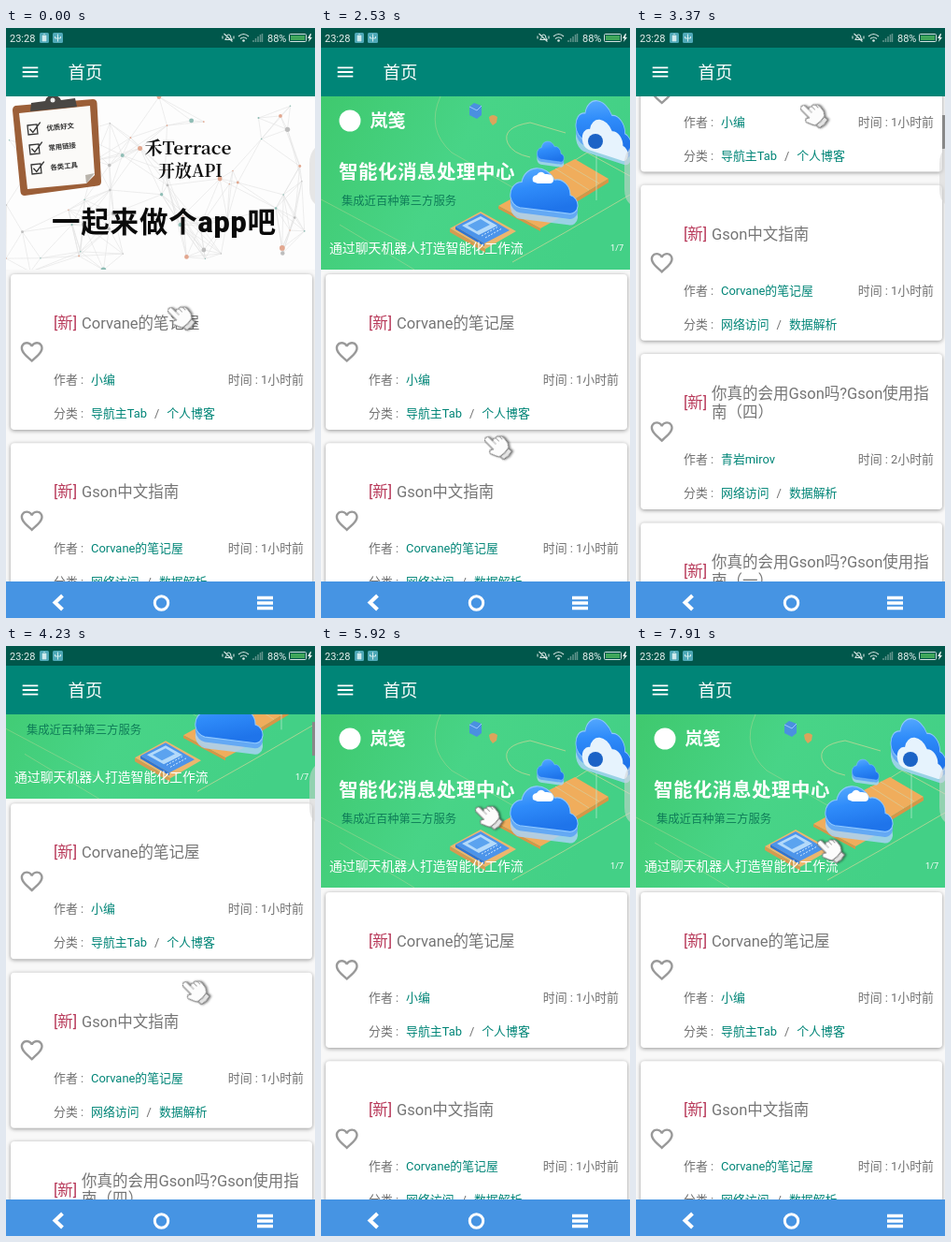
Recreate the animation shown at these times as an HTML page. Size 331 px wide and 630 px high, loop 8 s.

```html
<!DOCTYPE html>
<html lang="zh-CN">
<head>
<meta charset="utf-8">
<title>首页</title>
<style>
html, body { margin: 0; width: 100%; height: 100%; overflow: hidden; background: #f8f8f8; }
svg { display: block; width: 331px; height: 630px; }
text { font-family: Roboto, "Noto Sans CJK SC", "Noto Sans CJK", sans-serif; white-space: pre; }
.serif { font-family: "Noto Serif CJK SC", "Noto Serif", serif; font-weight: 700; }
.card rect { fill: #fff; filter: drop-shadow(0 1.5px 2px rgba(0,0,0,.4)); }
.name { font-size: 16.5px; fill: #757575; }
.new { font-size: 16.5px; fill: #b83a5a; }
.meta { font-size: 12.9px; fill: #707070; }
.tag { fill: #008577; }

#hand, #list, #first, #second, #bar, #pull, #disc, #turn, #arc {
  animation: 8s linear infinite;
}
#hand { animation-name: hand; }
#list { animation-name: list; }
#first { animation-name: first; }
#second { animation-name: second; }
#bar { animation-name: bar; }
#pull { animation-name: pull; }
#disc { animation-name: disc; }
#turn { animation-name: turn; animation-duration: calc(8s / 6); }
#arc { animation-name: arc; animation-duration: calc(8s / 6); animation-delay: -390ms; animation-timing-function: ease-in-out; }

@keyframes hand {
  0%, 2.75% { transform: translate(187px, 308px); }
  5%, 7.5% { transform: translate(187px, 162px); }
  17.375%, 29.125% { transform: translate(190px, 385px); }
  31.625%, 34.5% { transform: translate(189px, 446px); }
  42.125%, 44.75% { transform: translate(190px, 92px); }
  55.6%, 59.4% { transform: translate(207px, 460px); animation-timing-function: ease-out; }
  66.875%, 74% { transform: translate(179px, 181px); animation-timing-function: linear; }
  83.1%, 97.375% { transform: translate(185px, 418px); }
  98.875%, 100% { transform: translate(208px, 217px); }
}
@keyframes list {
  0%, 35.25% { transform: translateY(0); }
  42.125% { transform: translateY(-275px); }
  43.875%, 45.5% { transform: translateY(-345px); }
  54.5% { transform: translateY(-40px); }
  57.125% { transform: translateY(-7.3px); }
  58%, 100% { transform: translateY(0); }
}
@keyframes first { 0%, 18.74% { visibility: visible; } 18.75%, 100% { visibility: hidden; } }
@keyframes second { 0%, 18.74% { visibility: hidden; } 18.75%, 100% { visibility: visible; } }
@keyframes bar {
  0%, 35.24% { opacity: 0; transform: translateY(0); }
  35.25% { opacity: 1; transform: translateY(0); }
  42.125% { opacity: 1; transform: translateY(20px); }
  43.875%, 45.5% { opacity: 1; transform: translateY(25px); }
  56% { opacity: 1; transform: translateY(1px); }
  60%, 100% { opacity: 0; transform: translateY(0); }
}
@keyframes pull {
  0%, 9% { transform: translate(166px, 50px); }
  13% { transform: translate(166px, 112px); }
  17.5% { transform: translate(166px, 152px); animation-timing-function: ease-out; }
  20%, 27.5% { transform: translate(166px, 114px); }
  27.6%, 75.2% { transform: translate(166px, 50px); }
  79% { transform: translate(166px, 112px); }
  83.4% { transform: translate(166px, 156px); animation-timing-function: ease-out; }
  86%, 93.8% { transform: translate(166px, 114px); }
  93.9%, 100% { transform: translate(166px, 50px); }
}
@keyframes disc {
  0%, 25.6% { transform: scale(1); }
  27.5%, 74% { transform: scale(0); }
  74.1%, 92% { transform: scale(1); }
  93.8%, 99.9% { transform: scale(0); }
}
@keyframes turn { from { transform: rotate(-125deg); } to { transform: rotate(235deg); } }
@keyframes arc {
  0% { stroke-dasharray: 4 100; transform: rotate(0deg); }
  50% { stroke-dasharray: 75 100; transform: rotate(0deg); }
  100% { stroke-dasharray: 4 100; transform: rotate(360deg); }
}
</style>
</head>
<body>
<svg viewBox="0 0 331 630">
  <defs>
    <linearGradient id="green" x2="1" y2=".3">
      <stop stop-color="#3fc96e"/><stop offset=".5" stop-color="#48d487"/><stop offset="1" stop-color="#43d086"/>
    </linearGradient>
    <linearGradient id="sky" x2=".5" y2="1">
      <stop stop-color="#62b2ff"/><stop offset=".5" stop-color="#2f8cfa"/><stop offset="1" stop-color="#1f74ea"/>
    </linearGradient>
    <clipPath id="page"><rect y="73" width="331" height="518"/></clipPath>
    <clipPath id="slot"><rect y="73" width="331" height="185"/></clipPath>
    <path id="puff" d="M-34 8a14 14 0 0 1 12-16a19 19 0 0 1 35-6a13 13 0 0 1 17 13a9 9 0 0 1-2 18H-24a11 11 0 0 1-10-9z"/>
    <g id="cloud">
      <use href="#puff" y="11" fill="#a9d3f6" opacity=".85"/>
      <use href="#puff" y="5" fill="#64a9f4"/>
      <use href="#puff" fill="url(#sky)" stroke="#8fc8ff"/>
    </g>
    <path id="heart" fill="#999" d="M16.5 3c-1.74 0-3.41.81-4.5 2.09C10.910 3.810 9.240 3 7.500 3 4.420 3 2 5.420 2 8.500c0 3.780 3.400 6.860 8.550 11.540L12 21.350l1.450-1.320C18.600 15.360 22 12.280 22 8.500 22 5.420 19.580 3 16.500 3zm-4.400 15.550l-.1.1-.1-.1C7.140 14.240 4 11.390 4 8.500 4 6.500 5.500 5 7.500 5c1.540 0 3.040.99 3.570 2.360h1.870C13.460 5.990 14.960 5 16.500 5c2 0 3.500 1.500 3.500 3.500 0 2.890-3.140 5.740-7.900 10.050z"/>
  </defs>

  <rect width="331" height="630" fill="#f8f8f8"/>

  <g clip-path="url(#page)">
    <g id="list">
      <g clip-path="url(#slot)">
        <g id="first">
          <rect y="73" width="331" height="185" fill="#fdfdfd"/>
          <g id="net"></g>
          <path d="M10 83L93 76Q97 76 97.500 80L102 164Q102 168 98 168.500L20 179Q16 179 15.500 175L7 88Q7 84 10 83z" fill="#9c5f38"/>
          <path d="M14 91L90 83L95 157L86 166L23 172z" fill="#fbfaf8"/>
          <path d="M95 155L85 157L86 166z" fill="#b9b4ac"/>
          <path d="M26 89l1-9 15-2q1-6 8-6t9 5l15-2 2 9z" fill="#4a4744"/>
          <circle cx="50" cy="77" r="2.500" fill="#eee"/>
          <g id="ticks"></g>
          <text class="serif" x="195" y="135" font-size="19" text-anchor="middle" fill="#111">禾Terrace</text>
          <text class="serif" x="197.500" y="158.500" font-size="18" text-anchor="middle" fill="#111">开放API</text>
          <text x="49" y="218" font-size="30.500" letter-spacing=".8" font-weight="900" fill="#0a0a0a">一起来做个app吧</text>
        </g>
        <g id="second">
          <rect y="73" width="331" height="185" fill="url(#green)"/>
          <g fill="none" stroke="#d9d79a" stroke-width=".9">
            <path d="M128 73Q112 108 140 133L240 190M0 183L100 236M20 210L100 258" opacity=".4"/>
            <path d="M262 112L224 101Q193 106 200 123Q205 134 224 138M331 178L262 218L205 250M258 150L285 133L331 158" opacity=".75"/>
          </g>
          <path d="M190 190L223 172L268 196L235 214z" fill="#f0ad5c"/>
          <path d="M190 190L235 214V217L190 193z" fill="#d89546"/>
          <path d="M234 159L272 140L308 161L270 184z" fill="#f0ad5c"/>
          <path d="M270 184L308 161V165L270 188z" fill="#d89546"/>
          <path d="M262 145l36 21M251 150l36 23" stroke="#dfc489"/>
          <path d="M295 135V184" stroke="#b9e9cf" opacity=".7"/>
          <use href="#cloud" transform="translate(237 176) skewY(7) scale(1 1.100)"/>
          <path d="M227 164q-2-6 4-7q4-6 9-1q9-1 9 6q0 4-4 4h-13z" fill="#fff"/>
          <use href="#cloud" transform="translate(301 106) skewY(18) scale(.82 1.150)"/>
          <use href="#puff" transform="translate(303 120) skewY(18) scale(.68 .9)" fill="#e6f3fd"/>
          <circle cx="294" cy="121" r="8" fill="#1b63c6"/>
          <use href="#cloud" transform="translate(245 133) skewY(8) scale(.4 .5)"/>
          <path d="M159 84l5-4 8 3v10l-5 4-8-4z" fill="#4a90e0"/>
          <path d="M159 84l8 4 5-5" fill="none" stroke="#9cc7ff"/>
          <path d="M180 95q4-4 9 0l-1 6-4 3-3-4z" fill="#dba45c"/>
          <path d="M138 214L171 196L209 217L176 236z" fill="#ecb66e"/>
          <path d="M138 214L176 236V240L138 218z" fill="#d59a50"/>
          <path d="M144 212L171 198L202 216L175 230z" fill="#4c94ea"/>
          <path d="M144 212L175 230V233L144 215z" fill="#2f74d0"/>
          <path d="M151 211L171 201L189 211L169 221z" fill="#b4dafa"/>
          <path d="M157 211L171 204L181 210L167 217z" fill="#5ba3ef"/>
          <path d="M176 224l18-10M172 222l18-10" stroke="#d3eaff" stroke-dasharray="2 1.500"/>
          <circle cx="31" cy="99" r="11.500" fill="#fff"/>
          <g fill="#fff">
            <text x="52.500" y="106" font-size="19" font-weight="700">岚笺</text>
            <text x="19" y="161" font-size="20.500" font-weight="700" letter-spacing=".5">智能化消息处理中心</text>
            <text x="9" y="240" font-size="13.850">通过聊天机器人打造智能化工作流</text>
            <text x="310" y="238" font-size="9.200">1/7</text>
          </g>
          <text x="22" y="188.500" font-size="12.300" fill="#0f7d58">集成近百种第三方服务</text>
        </g>
      </g>
      <g id="cards"></g>
    </g>
    <rect id="bar" x="328" y="73" width="3" height="36" fill="#888" opacity="0"/>
    <path d="M331 128Q325 134 325 145V172Q325 183 331 188z" fill="#d4d4d4" opacity=".55"/>
    <g id="pull">
      <g id="disc">
        <circle r="18.400" fill="#fafafa" style="filter:drop-shadow(0 1.5px 1.5px rgba(0,0,0,.3))"/>
        <g id="turn"><circle id="arc" r="8" pathLength="100" fill="none" stroke="#111" stroke-width="2.500"/></g>
      </g>
    </g>
  </g>

  <rect width="331" height="73" fill="#008577"/>
  <rect width="331" height="21" fill="#00574b"/>
  <g fill="#e6efed" font-size="11">
    <text x="4" y="15">23:28</text>
    <text x="280" y="15">88%</text>
  </g>
  <rect x="36" y="5" width="10" height="11" rx="1.500" fill="#4fa9b8"/>
  <path d="M39 8h4v6h-4zM40 6.500h2" fill="#cfeaec" stroke="#cfeaec" stroke-width=".6"/>
  <rect x="50" y="5" width="11" height="11" rx="1.500" fill="#4fa9b8"/>
  <path d="M55.500 6.500v8M52.500 9v2h6V9" fill="none" stroke="#cfeaec"/>
  <g fill="none" stroke="#d5e4e1" stroke-width="1.100">
    <path d="M234.500 12.500q2-1 2-4q2-3 4 0q0 3 2 4zM233.500 6l9 8.500M232 8.500v3M244 8.500v3"/>
    <path d="M249 9q5.500-5 11 0M251 11.500q3.500-3 7 0"/>
  </g>
  <circle cx="254.500" cy="13.500" r="1.300" fill="#d5e4e1"/>
  <path d="M265 15v-2M267.500 15v-4M270 15v-6M272.500 15v-8M274.500 15v-9" stroke="#5f938b" stroke-width="1.500"/>
  <rect x="303.500" y="6.500" width="18" height="8" rx="1" fill="none" stroke="#d5e4e1"/>
  <rect x="305" y="8" width="15" height="5" fill="#3fa65a"/>
  <path d="M326 6l-3 5h2l-1 4 4-5h-2l1-4z" fill="#e6efed"/>
  <path d="M17.700 42.300h16.600M17.700 47h16.600M17.700 51.700h16.600" stroke="#fff" stroke-width="1.800"/>
  <text x="66.500" y="54" font-size="18.400" fill="#fff">首页</text>

  <rect y="591" width="331" height="39" fill="#4694e3"/>
  <g fill="none" stroke="#fff">
    <path d="M60.500 606l-8 7.500 8 7.500" stroke-width="4"/>
    <circle cx="166.500" cy="614" r="7.200" stroke-width="3"/>
    <path d="M269 608.500h17M269 614h17M269 619.500h17" stroke-width="3.400"/>
  </g>

  <g id="hand">
    <g transform="rotate(-45)" stroke="#777" stroke-linejoin="round" style="filter:drop-shadow(1px 1.5px 1px rgba(0,0,0,.5))">
      <path d="M-6 9Q0 11 6 9L7 15Q0 17.500-6 15z" fill="#e4e4e4"/>
      <path d="M-7 10Q-9 7-10 4Q-13 0-10-2Q-8-3-6 0V-13Q-3-17 0-13V-7Q2-10 4.500-7Q7-9 8.500-5Q11-5 11 0Q11 6 7 10Q0 12-7 10z" fill="#fcfcfc"/>
      <path d="M0-7v5M4.500-7v5M8.500-5v4" fill="none" stroke="#aaa"/>
    </g>
  </g>
</svg>
<script>
const $ = id => document.getElementById(id);

const posts = [
  [['Corvane的笔记屋'], '小编', 1, '导航主Tab', '个人博客'],
  [['Gson中文指南'], 'Corvane的笔记屋', 1, '网络访问', '数据解析'],
  [['你真的会用Gson吗?Gson使用指', '南（四）'], '青岩mirov', 2, '网络访问', '数据解析'],
  [['你真的会用Gson吗?Gson使用指', '南（一）'], '青岩mirov', 2, '网络访问', '数据解析']
];

const card = ([lines, author, hours, tag, sub], i) => `
  <g class="card" transform="translate(0 ${263 + i * 180.3})">
    <rect x="5" width="323" height="166" rx="4"/>
    <use href="#heart" transform="translate(13.3 68.5) scale(1.2)"/>
    <text class="new" x="51" y="58">[新]</text>
    ${lines.map((s, n) => `<text class="name" x="81" y="${lines.length > 1 ? 48 + n * 19.5 : 58}">${s}</text>`).join('')}
    <g class="meta">
      <text x="51" y="117">作者 :</text><text class="tag" x="91" y="117">${author}</text>
      <text x="319" y="117" text-anchor="end">时间 : ${hours}小时前</text>
      <text x="51" y="153">分类 :</text>
      <text x="91" y="153"><tspan class="tag">${tag}</tspan><tspan dx="8">/</tspan><tspan class="tag" dx="8">${sub}</tspan></text>
    </g>
  </g>`;
$('cards').innerHTML = posts.map(card).join('');

$('ticks').innerHTML = ['优质好文', '常用链接', '各类工具'].map((s, i) => `
  <g transform="translate(${23 + i * 2} ${104 + i * 21}) rotate(-6)">
    <path d="M0 0h10v10H0zM2 4l3 4 9-10" fill="none" stroke="#333" stroke-width="1.3"/>
    <text x="20" y="8" font-size="7.4" font-weight="700" fill="#333">${s}</text>
  </g>`).join('');

// Linked dots behind the first banner
let seed = 7;
const rnd = () => (seed = seed * 16807 % 2147483647) / 2147483647;
const dots = Array.from({ length: 60 }, () => [rnd() * 335, 73 + rnd() * 188, .7 + rnd() ** 3 * 2.2]);
const tints = ['#e2a78f', '#8fbdb5', '#bdbdbd'];
let links = '';
dots.forEach(([x, y], i) => dots.slice(i + 1).forEach(([u, v]) => {
  if (Math.hypot(x - u, y - v) < 58) links += `M${x} ${y}L${u} ${v}`;
}));
$('net').innerHTML = `<path d="${links}" stroke="#d9d9d9" stroke-width=".6" opacity=".75"/>` +
  dots.map(([x, y, r], i) => `<circle cx="${x}" cy="${y}" r="${r}" fill="${tints[i % 3]}"/>`).join('');
</script>
</body>
</html>
```
